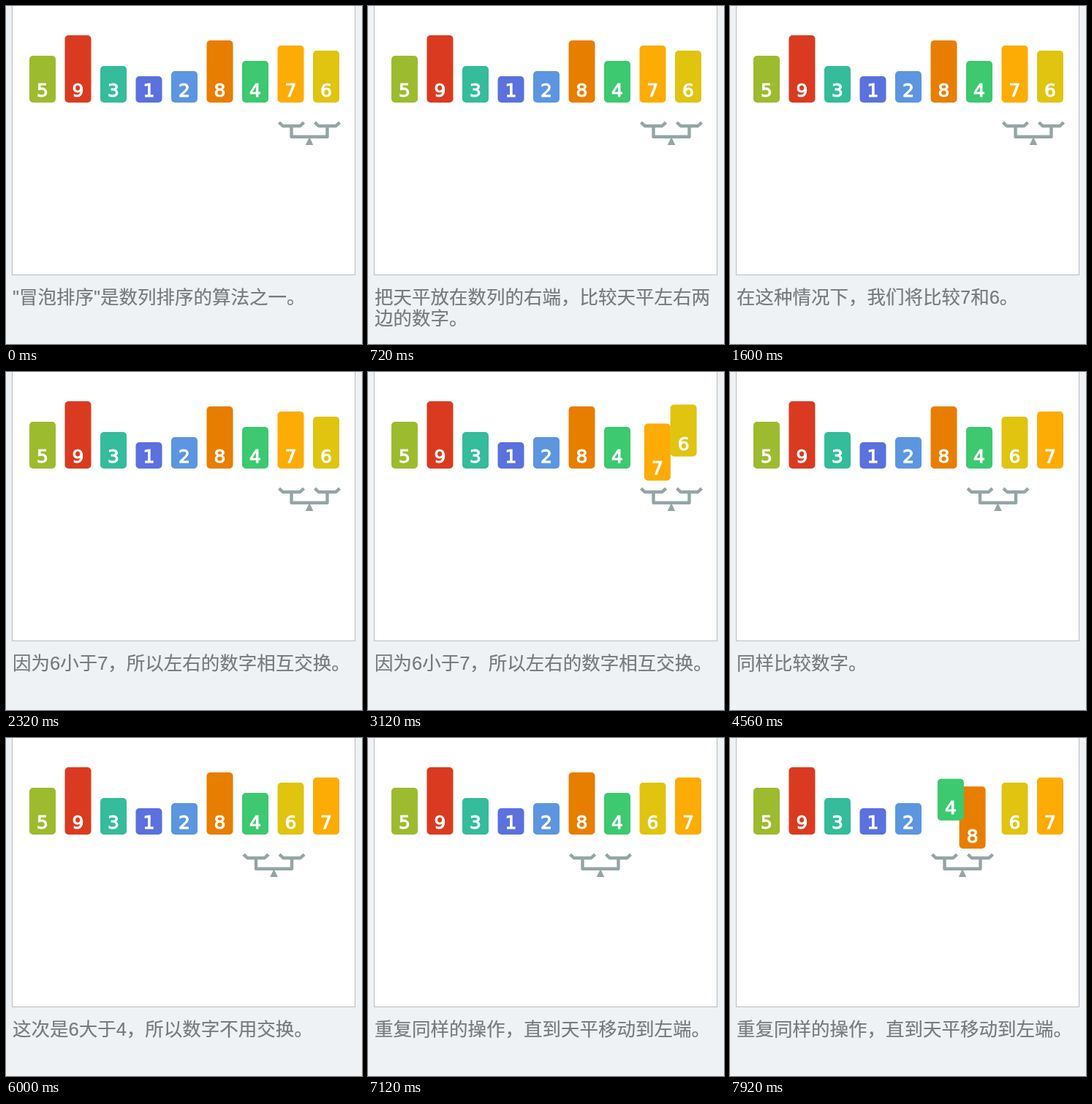
Write an HTML page that moves like this. It is 487 by 462 pixels and loops after 8000 ms.

```html
<!DOCTYPE html>
<html lang="zh-CN">
<head>
<meta charset="utf-8">
<title>Bubble sort</title>
<style>
  html, body { margin: 0; width: 100%; height: 100%; overflow: hidden; background: #eef2f5; }
  svg { display: block; width: 100%; height: 100%; }
  .digit {
    font: 25px "DejaVu Sans", sans-serif;
    fill: #fff; stroke: #fff; stroke-width: 1.1px; text-anchor: middle;
  }
  .caption {
    font: 500 25.5px "Liberation Sans", "Noto Sans CJK SC", "Noto Sans CJK", sans-serif;
    fill: #777a7c; stroke: #777a7c; stroke-width: .2px;
  }
</style>
</head>
<body>
<svg viewBox="0 0 487 462">
  <rect width="487" height="462" fill="#eef2f5"/>
  <rect x="8.5" y="-10" width="469" height="377.5" fill="#fff" stroke="#b9bcbe"/>
  <g id="bars"></g>
  <g id="scale">
    <path d="M-42 159.5L-37 164H-16L-7 159.5" visibility="hidden"/>
    <g fill="none" stroke="#95a5a6" stroke-width="4.4" stroke-linejoin="round">
      <path d="M-41.5 159.2L-36.3 164H-12.7L-7.5 159.2"/>
      <path d="M41.5 159.2L36.3 164H12.7L7.5 159.2"/>
      <path d="M-24.5 164V178.8H24.5V164"/>
    </g>
    <path d="M0 179L5.3 190H-5.3Z" fill="#95a5a6"/>
  </g>
  <text class="caption" x="9" y="407" id="line1"></text>
  <text class="caption" x="9" y="436" id="line2"></text>
</svg>
<script>
const LOOP = 8000, TICK = 80;
const LEFT = 32, STEP = 48.5, WIDTH = 36, FLOOR = 132;
const SWAP_MS = 338, MOVE_MS = 240;

const values = [5, 9, 3, 1, 2, 8, 4, 7, 6];
const colors = {
  1: '#5a71de', 2: '#5c96e0', 3: '#34bc9b', 4: '#3cc970', 5: '#9dbb2f',
  6: '#e0c410', 7: '#fcac04', 8: '#e87e00', 9: '#da3b20'
};
const captions = [
  [0, '"冒泡排序"是数列排序的算法之一。'],
  [160, '把天平放在数列的右端，比较天平左右两', '边的数字。'],
  [1280, '在这种情况下，我们将比较7和6。'],
  [1920, '因为6小于7，所以左右的数字相互交换。'],
  [3600, '比较后，天平向左移动一格。'],
  [4560, '同样比较数字。'],
  [5200, '这次是6大于4，所以数字不用交换。'],
  [6560, '重复同样的操作，直到天平移动到左端。']
];
const swaps = [
  { at: 3040, big: 7, small: 6 },
  { at: 7680, big: 8, small: 4 }
];
const moves = [3760, 6160];

const $ = id => document.getElementById(id);
const progress = (t, start, length) => Math.min(1, Math.max(0, (t - start) / length));

function add(parent, tag, attrs) {
  const el = document.createElementNS('http://www.w3.org/2000/svg', tag);
  for (const key in attrs) el.setAttribute(key, attrs[key]);
  return parent.appendChild(el);
}

const bars = values.map((value, slot) => {
  const g = add($('bars'), 'g', {});
  const height = 29 + 7 * value;
  add(g, 'rect', { y: FLOOR - height, width: WIDTH, height, rx: 5, fill: colors[value] });
  add(g, 'text', { class: 'digit', x: WIDTH / 2, y: 123.6 }).textContent = value;
  return { g, value, x: LEFT + slot * STEP };
});

// Swapped bars turn half a circle around their midpoint.
function offset(value, t) {
  let dx = 0, dy = 0;
  for (const { at, big, small } of swaps) {
    const side = value === big ? 1 : value === small ? -1 : 0;
    const angle = Math.PI * progress(t, at, SWAP_MS);
    dx += side * STEP / 2 * (1 - Math.cos(angle));
    dy += side * STEP / 2 * Math.sin(angle);
  }
  return [dx, dy];
}

function draw(t) {
  for (const { g, value, x } of bars) {
    const [dx, dy] = offset(value, t);
    g.setAttribute('transform', `translate(${x + dx} ${dy})`);
  }
  const shift = moves.reduce((sum, at) => sum + progress(t, at, MOVE_MS), 0);
  $('scale').setAttribute('transform', `translate(${415 - shift * STEP} 0)`);

  const [, first, second = ''] = captions.filter(c => c[0] <= t).pop();
  if ($('line1').textContent !== first) $('line1').textContent = first;
  if ($('line2').textContent !== second) $('line2').textContent = second;
}

const begin = performance.now();
function frame() {
  const t = (performance.now() - begin) % LOOP;
  draw(Math.floor(t / TICK) * TICK);
  requestAnimationFrame(frame);
}
frame();
</script>
</body>
</html>
```
